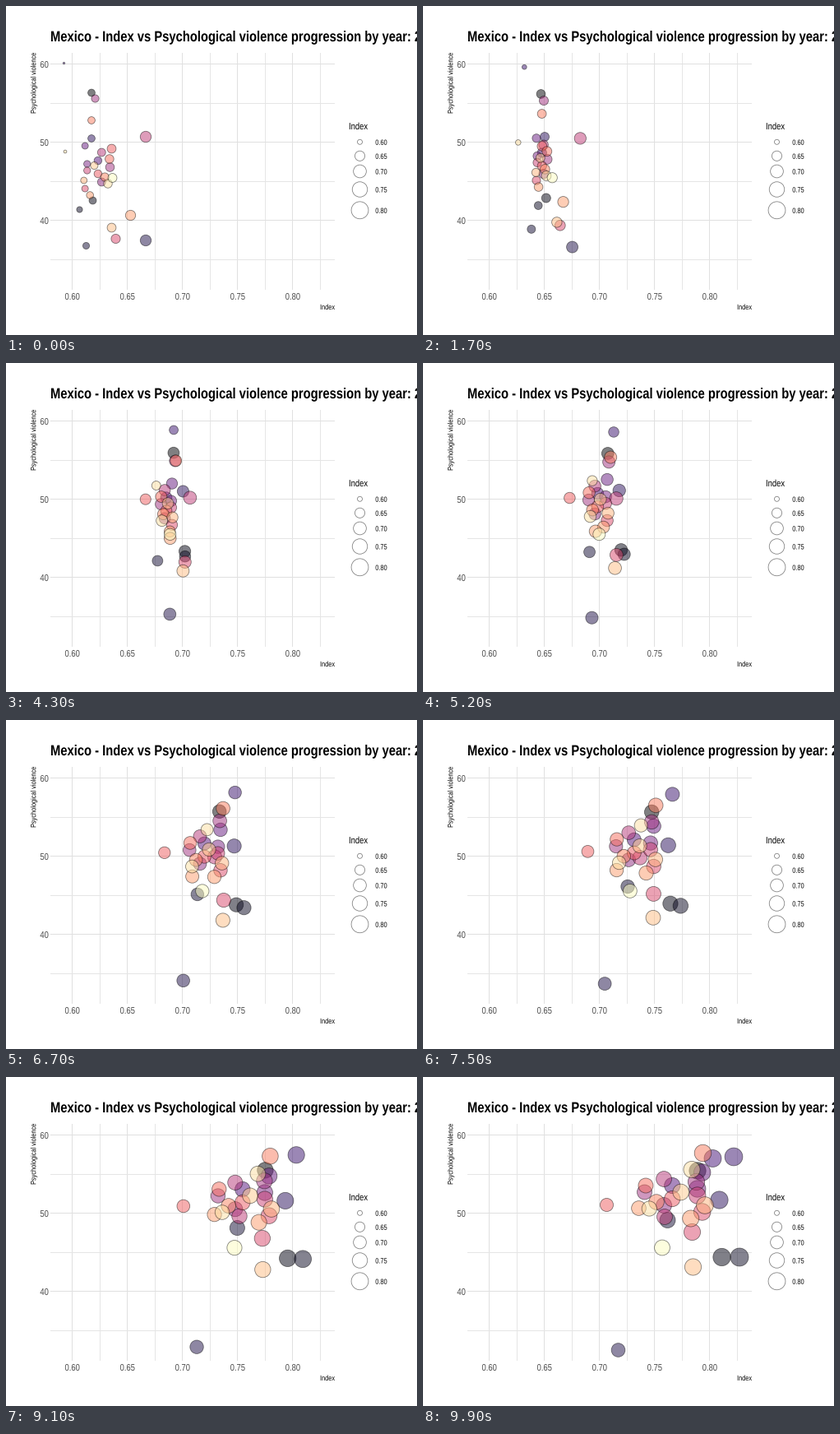
These frames come from a looping animation (500 by 400 pixels, 10000 ms). A matplotlib script:

```python
import numpy as np
import matplotlib.pyplot as plt
from matplotlib.animation import FuncAnimation
from matplotlib.patches import Circle, PathPatch
from matplotlib.textpath import TextPath
from matplotlib.transforms import Affine2D

W, H, DPI = 500, 400, 100
FRAMES, STEP = 100, 100
PX = 72 / DPI          # one pixel in points
NARROW = 0.82          # condensed sans face
LEFT, RIGHT, TOP, BOTTOM = 54, 400, 57, 345

# Outlying states: x, y in the first year and x, y in the last.
DARK = [
    (103.5, 105.5, 333.5, 114), (105, 236.5, 363, 219),
    (89, 247.5, 384.5, 219), (97, 291.5, 297, 174),
    (169.5, 285, 237, 332), (103.5, 161, 360, 149.5),
    (70, 69.5, 377.5, 97),
]
BRIGHT = [
    (108, 112.5, 332, 127.5), (169.5, 159, 293.5, 170),
    (133, 283, 327, 188.5), (128, 173.5, 223, 155.5),
    (103.5, 139, 340, 92.5), (151, 254.5, 262, 159.5),
    (128, 269.5, 328, 231), (71.5, 177, 326.5, 112.5),
    (129, 209, 290.5, 207.5),
]
NEWCOMER = (352, 99)   # only measured in the last year
CROWD = 15
LAST_SHADE = 31


def crowd_state(i):
    """Central cluster: states that start further left end further right."""
    side = np.cos(1.2 * (i - 4))
    lift = np.cos(np.pi / 2 * (i - 3))
    return (110 + 16 * side, 188 + 2 * i + 20 * lift,
            306 - 37 * side, 132 + 2 * i + 18 * lift)


def index_x(v):
    return 80.5 + (v - 0.6) * 1341


def value_y(v):
    return 70.5 + (60 - v) * 9.5


def radius(x):
    return 1.2 + 9.8 * max(0, (x - 70) / 314.5) ** 0.5


fig = plt.figure(figsize=(W / DPI, H / DPI), dpi=DPI, facecolor="white")
ax = fig.add_axes([0, 0, 1, 1])
ax.set_xlim(0, W)
ax.set_ylim(H, 0)
ax.axis("off")


def label(x, y, s, size, color="black", align=0, weight="normal", angle=0):
    """Draw s with its baseline at y; align is 0 left, 0.5 centre, 1 right."""
    font = {"family": "Liberation Sans", "weight": weight}
    path = TextPath((0, 0), s, size=size, prop=font)
    shift = path.get_extents().x1 * align
    move = (Affine2D().translate(-shift, 0).scale(NARROW, -1)
            .rotate_deg(-angle).translate(x, y))
    ax.add_patch(PathPatch(move.transform_path(path), fc=color, lw=0, zorder=5))


def ring(x, y, r, fill="none", order=0):
    dot = Circle((x, y), r, fc=fill, ec=(0, 0, 0, 0.5), lw=0.8 * PX,
                 zorder=3 + order / 100)
    return ax.add_patch(dot)


def state_dot(x, y, shade):
    fill = plt.get_cmap("magma")(shade / LAST_SHADE, alpha=0.5)
    return ring(x + 0.5, y, radius(x), fill, shade)


def grid_line(xs, ys, minor):
    ax.plot(xs, ys, color="#e5e5e5" if minor else "#e0e0e0", lw=PX, zorder=1,
            solid_capstyle="butt", snap=False)


for i in range(10):
    x = np.floor(index_x(0.6 + i * 0.025)) + 0.5
    grid_line([x, x], [TOP, BOTTOM], i % 2)
for i in range(6):
    y = np.floor(value_y(60 - 5 * i)) + 0.5
    grid_line([LEFT, RIGHT], [y, y], i % 2)

for i in range(5):
    v = 0.6 + i * 0.05
    label(index_x(v), 357, f"{v:.2f}", 11.5, "#4d4d4d", 0.5)
for v in (60, 50, 40):
    label(51.5, value_y(v) + 4.5, str(v), 11.5, "#4d4d4d", 1)

label(54, 43, "Mexico - Index vs Psychological violence progression by year: 2",
      18, weight="bold")
label(400, 369, "Index", 9, align=1)
label(36.3, TOP, "Psychological violence", 9, align=1, angle=90)

label(417, 150, "Index", 11.5)
for i, y in enumerate((165.3, 182.3, 201, 223, 248.3)):
    v = 0.6 + i * 0.05
    ring(430.5, y, radius(index_x(v)))
    label(449.3, y + 3.5, f"{v:.2f}", 9)

states = DARK + [crowd_state(i) for i in range(CROWD)] + BRIGHT
shades = [*range(len(DARK)), *np.linspace(8, 29, CROWD),
          *np.linspace(14, LAST_SHADE, len(BRIGHT))]
dots = [state_dot(x0, y0, shade)
        for (x0, y0, _, _), shade in zip(states, shades)]
newcomer = state_dot(*NEWCOMER, len(DARK))


def update(frame):
    t = frame / (FRAMES - 1)
    for dot, (x0, y0, x1, y1) in zip(dots, states):
        r0, r1 = radius(x0), radius(x1)
        dot.center = x0 + (x1 - x0) * t + 0.5, y0 + (y1 - y0) * t
        dot.set_radius(r0 + (r1 - r0) * t)
    newcomer.set_visible(frame == FRAMES - 1)
    return [*dots, newcomer]


anim = FuncAnimation(fig, update, frames=FRAMES, interval=STEP,
                     repeat=True, repeat_delay=0, blit=False)
plt.show()
```
